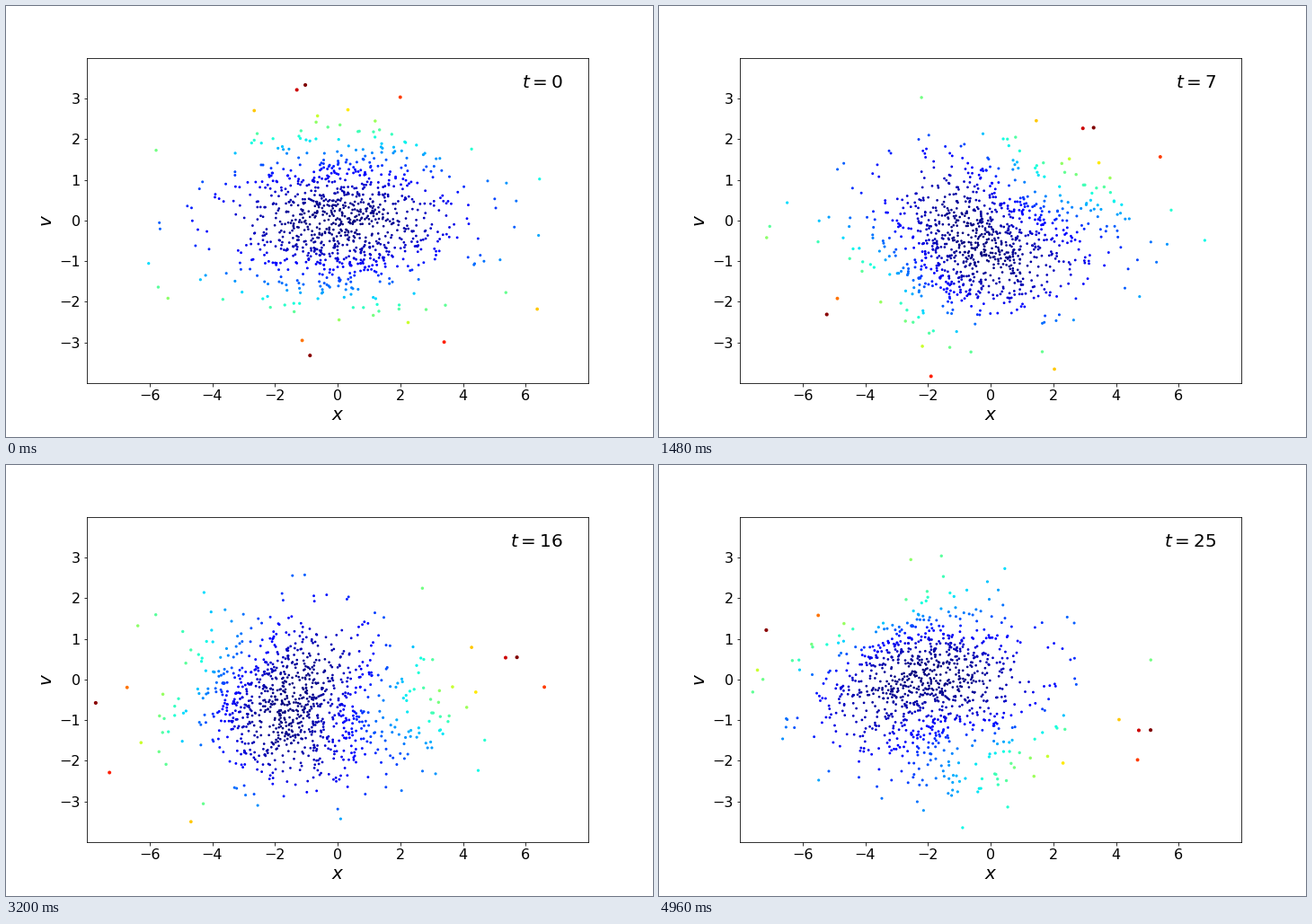
Recreate the animation shown at these times as a matplotlib script. Size 720 by 480 pixels, loop 5 s.

```python
import numpy as np
import matplotlib.pyplot as plt
from matplotlib.animation import FuncAnimation

FRAMES = 125
INTERVAL = 40
DT = 0.04
COUNT = 1000
CENTER = -1.02
WIDTH = 2.1
PULL = 1.02

# the most energetic particles, as (x, v)
FASTEST = np.array([
    (-1.03, 3.33), (-1.3, 3.21), (2, 3.03), (-2.66, 2.7), (.33, 2.72),
    (-.64, 2.57), (-.88, -3.32), (-1.13, -2.95), (3.4, -2.99), (6.37, -2.18),
    (2.25, -2.51),
])


def level(x, v):
    """Colour level of a particle, 0 to 1."""
    return (v**2 + 0.075 * x**2) / 11.2


def accel(x):
    return -PULL * np.tanh((x - CENTER) / WIDTH)


def start_state(seed=4):
    """Isothermal sheet, plus the fastest particles."""
    rng = np.random.default_rng(seed)
    x = 2 * np.arctanh(rng.uniform(-1, 1, 2 * COUNT))
    v = rng.normal(size=2 * COUNT)
    keep = (level(x, v) < 0.56) & (np.abs(x) < 6.5)
    rest = COUNT - len(FASTEST)
    sheet = np.column_stack([x, v])[keep][:rest]
    return np.vstack([sheet, FASTEST]).T


def simulate(x, v):
    path = []
    for _ in range(FRAMES):
        path.append(np.column_stack([x, v]))
        v = v + accel(x) * DT / 2
        x = x + v * DT
        v = v + accel(x) * DT / 2
    return path


x0, v0 = start_state()
path = simulate(x0, v0)
shade = level(x0, v0)

plt.rcParams["font.family"] = "DejaVu Sans"
fig, ax = plt.subplots(figsize=(720 / 72, 480 / 72), dpi=72)
fig.subplots_adjust(left=0.125, right=0.9, bottom=0.125, top=0.88)
ax.set_xlim(-8, 8)
ax.set_ylim(-4, 4)
ax.set_xticks(range(-6, 7, 2))
ax.set_yticks(range(-3, 4))
ax.tick_params(labelsize=16)
ax.set_xlabel("$x$", fontsize=20)
ax.set_ylabel("$v$", fontsize=20)

dots = ax.scatter(x0, v0, c=shade, s=7 + 10 * shade, cmap="jet",
                  vmin=0, vmax=1, linewidths=0)
clock = ax.text(0.95, 0.95, "$t=0$", transform=ax.transAxes,
                ha="right", va="top", fontsize=20)


def update(i):
    dots.set_offsets(path[i])
    clock.set_text(f"$t={i / 5:.0f}$")
    return dots, clock


anim = FuncAnimation(fig, update, frames=FRAMES, interval=INTERVAL,
                     repeat=True, repeat_delay=0)
plt.show()
```
